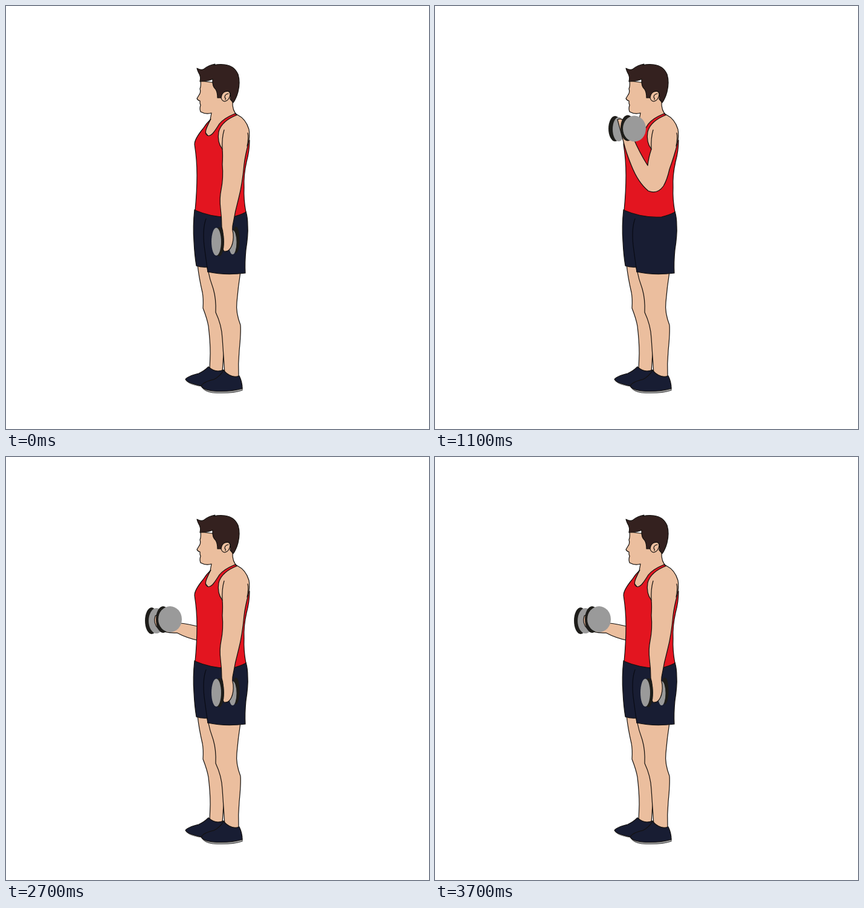
An HTML page with a canvas that plays this animation: 700x700 px, repeating every 4200 ms.

```html
<!DOCTYPE html>
<html lang="en">
<head>
<meta charset="utf-8">
<title>Dumbbell curl</title>
<style>
  html, body { margin: 0; width: 100%; height: 100%; overflow: hidden; background: #fff; }
  canvas { display: block; width: 700px; height: 700px; }
</style>
</head>
<body>
<canvas id="stage" width="700" height="700"></canvas>
<script>
const ctx = document.getElementById('stage').getContext('2d');
const SKIN = '#ebbe9e', RED = '#e31520', NAVY = '#181d33', HAIR = '#34211f';
const GREY = '#9a9a9a', BLACK = '#1e1d1a', LINE = '#14110f';

const SHOULDER = 'M383 180Q397 187 402 204Q404 214 401 228';
const ARMHOLE = '358 237Q349 225 352 208Q357 190 383 180Z';

// Plates: x, y, rx, ry of the rim, then of the face, then tilt in degrees.
const nearArm = {
  down: {
    back: [380.5, 387, 6, 22, 375, 391, 6.5, 20, 0],
    arm: SHOULDER + 'Q396 246 394 262Q391 295 385 318Q379 340 375 364Q374 370 376 377Q377 389 373 398Q369 407 361 406Q357 402 358 393Q361 378 357 366Q357 350 355 335Q353 318 356 304Q360 285 358 262Q359 247 ' + ARMHOLE,
    front: [353, 390, 8, 24, 348, 390, 8, 23, 0]
  },
  mid: {
    back: [261, 271.5, 11, 23, 265, 268, 11, 21, -45],
    arm: SHOULDER + 'Q396 248 388 270Q383 290 377 299Q369 311 355 309Q320 299 292 280Q280 281 270 276Q261 269 261 255Q266 256 270 262Q280 262 300 268Q326 275 352 277Q353 258 ' + ARMHOLE,
    front: [279, 258, 12, 22, 282.5, 253.5, 14.5, 21, -46]
  },
  up: {
    back: [298, 203, 11, 21, 304, 204, 10, 20, 0],
    arm: SHOULDER + 'Q396 248 388 270Q384 288 378 298Q368 312 353 306Q336 292 325 264Q316 242 312 225Q308 210 302 188Q309 184 317 194L328 218Q338 242 352 264Q353 252 ' + ARMHOLE,
    front: [319, 202, 12, 21.5, 330, 203, 19, 21.5, 0]
  }
};
const farArm = {
  mid: {
    back: [241, 271, 11, 22, 249, 271, 13, 21, 0],
    arm: 'M320 281Q300 276 289 275L270 268Q252 258 247 263Q243 275 252 284Q262 292 283 291Q300 300 320 304Z',
    front: [260, 269, 12, 22, 271.5, 268.5, 19.5, 21.5, 0]
  },
  up: {
    back: [267.5, 200, 10.5, 21.5, 274, 201, 11, 20.5, 0],
    arm: 'M320 282Q311 262 305 240Q300 225 297 214L286 190Q277 180 271 184Q272 195 276 205Q279 212 281 222Q284 245 295 275Q304 297 318 306Z',
    front: [288, 198.5, 12, 21.5, 299, 198.5, 19, 21.5, 0]
  }
};

const shape = (d, fill, line = LINE) => ({ path: new Path2D(d), fill, line });

const legsAndShoes = [
  shape('M317 428Q319 448 325 474Q327 484 326 500Q333 518 335 530Q338 555 338 575L337 602Q350 612 358 606L361 560L347 430Z', SKIN),
  shape('M298 618Q300 624 311 627Q322 631 340 628L338 622Z', GREY, GREY),
  shape('M335 597Q328 604 319 608Q299 613 297 618Q300 623 312 626Q322 630 336 628L362 612L360 602Q347 608 335 597Z', NAVY),
  shape('M334 436Q337 452 343 468Q348 485 347 507Q357 528 358 550L362 609Q375 619 385 613Q384 592 386 570Q389 540 388 528Q380 507 382 490Q384 466 388 440Z', SKIN),
  shape('M324 630Q328 638 342 640Q374 642 391 636V632Z', GREY, '#555'),
  shape('M360 603Q354 613 344 618Q326 622 323 629Q326 635 343 637Q369 639 391 633Q391 622 386 612Q373 617 360 603Z', NAVY)
];

const body = [
  shape('M312 337Q309 365 311 390Q312 412 315 430Q324 433 333 432L334 440Q362 446 396 442Q395 425 397 404Q401 378 400 364Q400 350 397 340Z', NAVY),
  shape('M331 352Q325 368 328 397Q331 420 334 440', null, '#090b14'),
  shape('M322 124Q323 132 321 137Q323 143 319 148L316 153Q317 156 321 157L321 161L322 164Q320 170 322 175Q331 180 340 177L338 188L329 208L337 218L350 206L383 181Q374 174 375 157L370 130Z', SKIN),
  shape('M339 187Q331 195 326 203Q312 220 312 229Q316 254 316 280Q316 306 313 338Q343 351 375 349Q388 346 397 341Q393 320 394 300Q393 280 398 258Q403 240 403 222L370 215L383 181L379 178Q360 186 353 195Q347 205 342 211Q335 218 331 212Q328 207 339 187Z', RED),
  shape('M316 103Q323 107 328 104Q335 98 346 96L344 98Q352 96 362 97Q378 99 384 113Q388 126 384 142Q381 153 376 160L371 154Q373 144 368 141Q362 140 358 146L356 152H350Q350 143 347 138Q341 133 342 121Q333 125 321 125Q323 117 319 111Q317 107 316 103Z', HAIR),
  shape('M356 152Q357 144 362 142Q370 139 371 146Q370 156 362 158Q357 157 356 152Z', SKIN),
  shape('M368 145Q362 146 362 151Q364 153 363 155', null)
];

const creases = [
  shape('M361 205Q357 218 358 237', null),
  shape('M400 210Q402 217 399 232', null)
];

for (const pose of [...Object.values(nearArm), ...Object.values(farArm)]) {
  pose.arm = shape(pose.arm, SKIN);
}

function draw({ path, fill, line }) {
  if (fill) {
    ctx.fillStyle = fill;
    ctx.fill(path);
  }
  ctx.strokeStyle = line;
  ctx.stroke(path);
}

function ellipse(x, y, rx, ry, tilt, color) {
  ctx.fillStyle = color;
  ctx.beginPath();
  ctx.ellipse(x, y, rx, ry, tilt * Math.PI / 180, 0, 2 * Math.PI);
  ctx.fill();
}

function drawPlate([x, y, rx, ry, faceX, faceY, faceRx, faceRy, tilt]) {
  ellipse(x, y, rx, ry, tilt, BLACK);
  ellipse(faceX, faceY, faceRx, faceRy, tilt, GREY);
}

function drawArm(pose) {
  drawPlate(pose.back);
  draw(pose.arm);
  if (pose === nearArm.down || pose === nearArm.mid || pose === nearArm.up) creases.forEach(draw);
  drawPlate(pose.front);
}

// End time of each step, near pose, far pose (the resting far arm is hidden).
const steps = [
  [500, 'down'], [1100, 'mid'], [1600, 'up'], [2200, 'mid'],
  [2700, 'down'], [3200, 'down', 'mid'], [3700, 'down', 'up'], [4200, 'down', 'mid']
];

function render(now) {
  const time = now % 4200;
  const [, near, far] = steps.find(([end]) => time < end);
  ctx.fillStyle = '#fff';
  ctx.fillRect(0, 0, 700, 700);
  ctx.lineWidth = 1.2;
  ctx.lineJoin = ctx.lineCap = 'round';
  legsAndShoes.forEach(draw);
  if (far) drawArm(farArm[far]);
  body.forEach(draw);
  drawArm(nearArm[near]);
}

const start = performance.now();
function tick() {
  render(performance.now() - start);
  requestAnimationFrame(tick);
}
tick();
</script>
</body>
</html>
```
